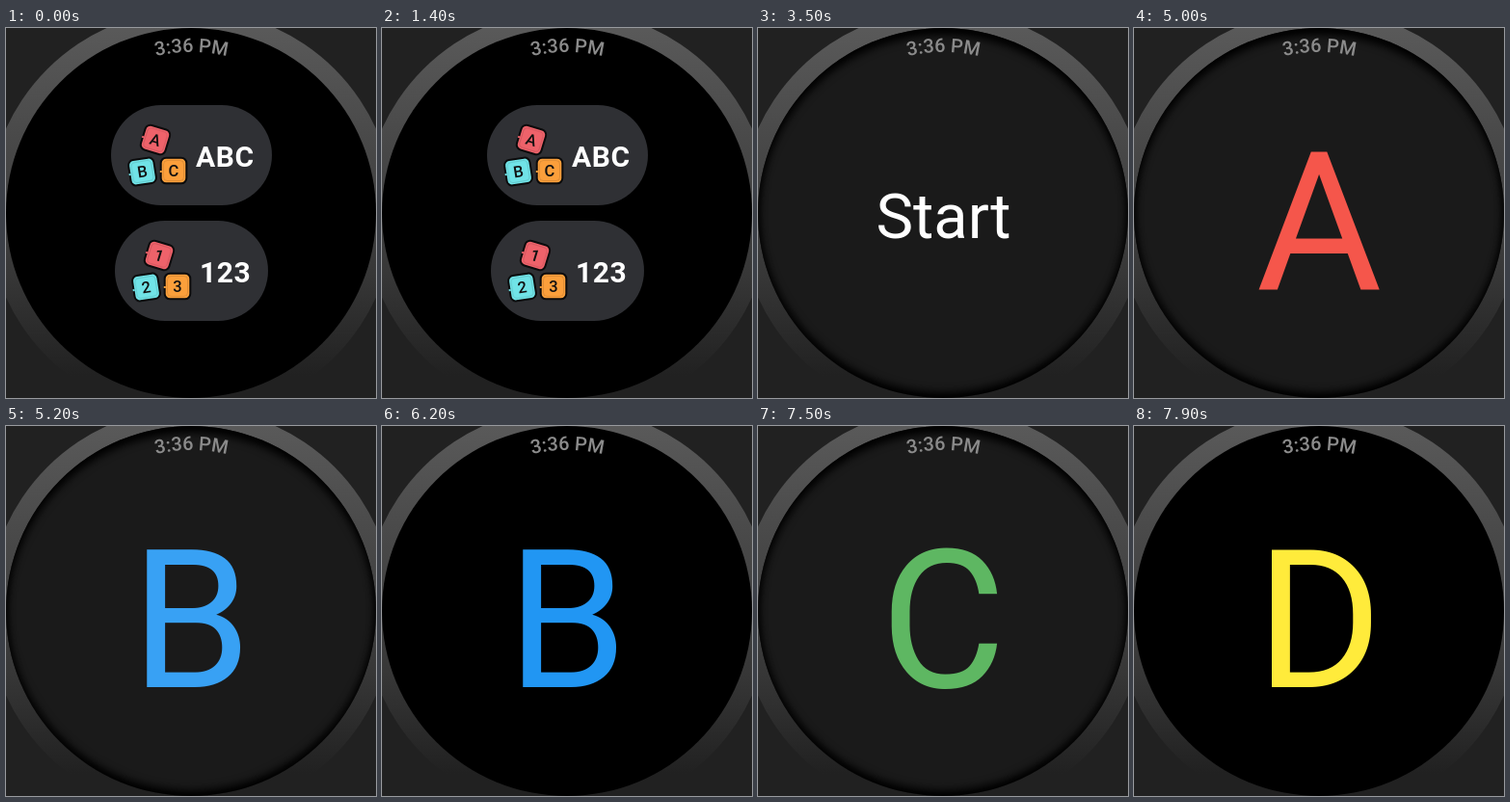
Write an HTML page that moves like this. It is 384x384 px and loops after 8000 ms.

```html
<!DOCTYPE html>
<html lang="en">
<head>
<meta charset="utf-8">
<style>
html, body { margin: 0; width: 100%; height: 100%; overflow: hidden; background: #212121; }
svg, #press { position: absolute; left: 0; top: 0; width: 384px; height: 384px; }
svg { font-family: Roboto, sans-serif; }
#press {
  border-radius: 50%;
  background: rgba(255, 255, 255, .102);
  box-shadow: inset 0 7px 8px #000, inset 0 -6px 8px #000;
}
.label { font-size: 30px; font-weight: 700; letter-spacing: .6px; fill: #fff; }
.block text { font-size: 16.5px; font-weight: 500; text-anchor: middle; fill: #111; }
#word, #letter { text-anchor: middle; }
</style>
</head>
<body>
<svg viewBox="0 0 384 384">
  <defs>
    <linearGradient id="rim" x2="0" y2="1">
      <stop offset="0" stop-color="#5c5c5c"/>
      <stop offset=".3" stop-color="#4a4a4a"/>
      <stop offset=".65" stop-color="#373737"/>
      <stop offset=".9" stop-color="#212121"/>
    </linearGradient>
  </defs>
  <circle cx="192" cy="192" r="211" fill="url(#rim)"/>
  <circle cx="192" cy="192" r="192"/>
  <g id="menu"></g>
  <text id="word" x="192.5" y="218" font-size="65" fill="#fff">Start</text>
  <text id="letter" x="192" y="271.4" font-size="200"></text>
</svg>
<div id="press"></div>
<svg viewBox="0 0 384 384">
  <path id="arc" d="M26 191a166 166 0 0 1 332 0" fill="none"/>
  <text font-size="20" font-weight="500" fill="#8b8b8b" text-anchor="middle">
    <textPath href="#arc" startOffset="50.1%">3:36 PM</textPath>
  </text>
</svg>
<script>
const $ = id => document.getElementById(id);
const LOOP = 8000;

// Each tap: start, letter swap, end of hold, end of fade
const taps = [
  { at: 3500, swap: 3700, hold: 3750, end: 4100, text: 'A', color: '#f44336' },
  { at: 5000, swap: 5100, hold: 5220, end: 5500, text: 'B', color: '#2196f3' },
  { at: 6400, swap: 6500, hold: 6620, end: 6900, text: 'C', color: '#4caf50' },
  { at: 7500, swap: 7600, hold: 7680, end: 7900, text: 'D', color: '#ffeb3b' }
];

const block = (x, y, turn, color, char) => `
  <g class="block" transform="translate(${x} ${y}) rotate(${turn})">
    <rect x="-13.3" y="-13.3" width="26.6" height="26.6" rx="5.5" fill="${color}" stroke="#0b0b0c" stroke-width="2"/>
    <rect x="-10.5" y="-10.5" width="21" height="21" rx="4" fill="none" stroke="#000" stroke-opacity=".1"/>
    <path d="M-13.2 0v2" stroke="${color}" stroke-width="2"/>
    <text y="5.8">${char}</text>
  </g>`;

const button = (x, y, width, label) => `
  <g transform="translate(${x} ${y})">
    <rect width="${width}" height="104" rx="52" fill="#2f3034"/>
    ${block(46, 36, 17, '#ee626a', label[0])}
    ${block(32.5, 69, -9, '#70e3e7', label[1])}
    ${block(65, 68, 0, '#fb9f3b', label[2])}
    <text class="label" x="88" y="63.5">${label}</text>
  </g>`;

$('menu').innerHTML = button(109, 80, 167, 'ABC') + button(113, 200, 159, '123');

const ramp = (t, from, to) => Math.min(1, Math.max(0, (t - from) / (to - from)));

function draw(now) {
  const t = now % LOOP;
  const shown = taps.filter(tap => t >= tap.swap).pop();
  const tap = taps.find(tap => t >= tap.at && t < tap.end);

  $('menu').style.opacity = 1 - ramp(t, 1450, 1700);
  $('word').style.opacity = shown ? 0 : ramp(t, 1550, 1800);
  $('letter').textContent = shown ? shown.text : '';
  $('letter').style.fill = shown ? shown.color : '';
  $('press').style.opacity = tap ? 1 - ramp(t, tap.hold, tap.end) : 0;
  requestAnimationFrame(draw);
}
draw(0);
</script>
</body>
</html>
```
